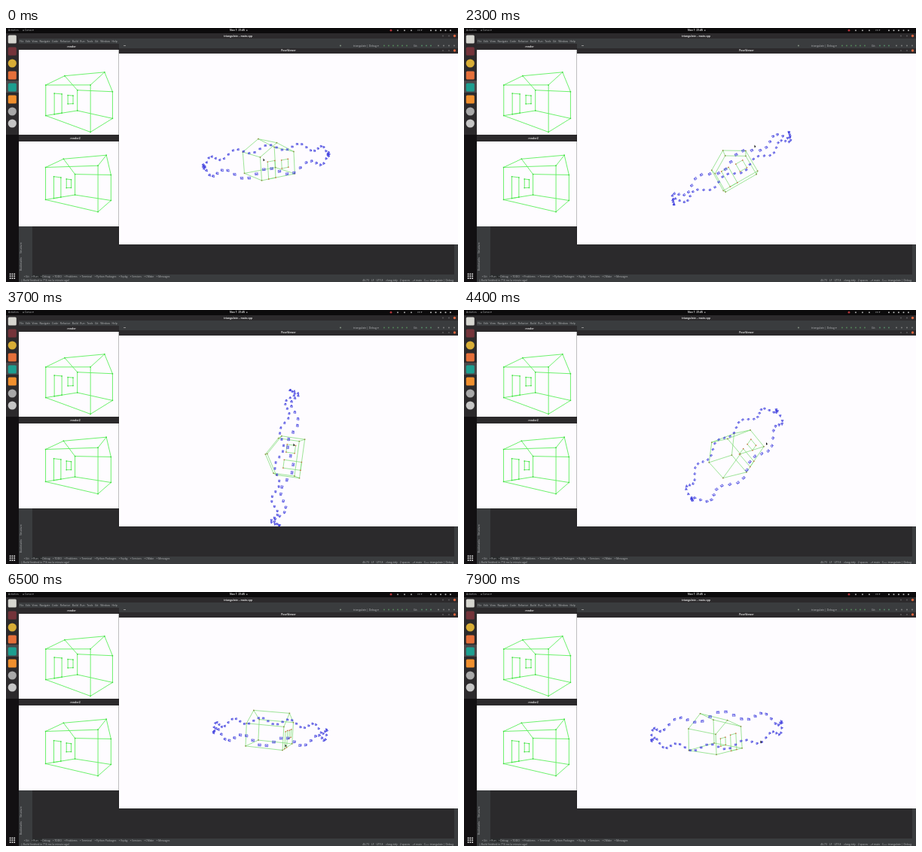
An HTML page with a canvas for the animation above (8000 ms loop, 600x338 px).

```html
<!DOCTYPE html>
<html lang="en">
<head>
<meta charset="utf-8">
<title>Pose viewer</title>
<style>
  html, body { margin: 0; width: 100%; height: 100%; overflow: hidden; background: #2b2a2c; }
  svg, canvas { position: absolute; left: 0; top: 0; width: 600px; height: 338px; }
  text { font-family: "Open Sans", "Noto Sans", sans-serif; font-size: 3.4px; fill: #b4b6b8; white-space: pre; }
  .title { font-weight: 700; fill: #dedede; text-anchor: middle; }
</style>
</head>
<body>
<svg id="desk" viewBox="0 0 600 338"></svg>
<canvas id="view"></canvas>
<script>
const desk = document.getElementById('desk');
const view = document.getElementById('view');
const g = view.getContext('2d');
const ratio = window.devicePixelRatio || 1;
view.width = 600 * ratio;
view.height = 338 * ratio;

const WHITE = '#fefcff', PANEL = '#3a3c3e', BAR = '#2c2a2c';

// ---------- desktop ----------
function add(tag, attrs, parent = desk) {
  const el = document.createElementNS('http://www.w3.org/2000/svg', tag);
  for (const key in attrs) el.setAttribute(key, attrs[key]);
  parent.appendChild(el);
  return el;
}
const box = (x, y, width, height, fill, rx = 0) => add('rect', { x, y, width, height, fill, rx });
const dot = (cx, cy, r, fill) => add('circle', { cx, cy, r, fill });
const label = (x, y, s, attrs = {}) => { add('text', { x, y, ...attrs }).textContent = s; };
const title = (x, y, s) => label(x, y, s, { class: 'title' });
const dots = (x, y, step, n, r, fill) => { for (let i = 0; i < n; i++) dot(x + i * step, y, r, fill); };

// words set one after another with an even gap
function row(x, y, gap, words, attrs = {}) {
  const line = add('text', { x, y, ...attrs });
  words.forEach((w, i) => { add('tspan', { dx: i ? gap : 0 }, line).textContent = w; });
}
function windowButtons(y) {
  dots(580, y, 8, 2, 1.1, '#575557');
  dot(595.5, y, 1.7, '#d9643f');
}

function drawIde() {
  box(0, 0, 600, 7, '#0c0b0c');
  row(3, 4.4, 5, ['Activities', '● Corvo ▾']);
  title(309, 4.4, 'Nov 1  21:45  ●');
  dot(511, 3.2, 1.4, '#b5343a');
  dots(520, 3.2, 9, 3, 1, '#a5a5a5');
  label(546, 4.4, 'en ▾');
  dots(564, 3.2, 6.5, 5, 1, '#b8b8b8');

  box(17, 7, 583, 7, BAR);
  title(308, 11.8, 'triangulate – main.cpp');
  windowButtons(10.5);
  box(17, 14, 583, 13, PANEL);
  row(18, 18.5, 2.6, 'File Edit View Navigate Code Refactor Build Run Tools Git Window Help'.split(' '));
  box(156, 23, 3, 1, '#909090');
  dot(444, 23.5, 1.1, '#7d8a7c');
  label(461, 24.7, 'triangulate | Debug ▾');
  dots(502, 23.5, 6, 6, .9, '#578a5c');
  label(541, 24.7, 'Git:');
  dots(552, 23.5, 6, 3, .9, '#578f6a');
  dots(574, 23.5, 7, 4, .9, '#858585');

  box(17, 264, 18, 64, PANEL);
  box(595, 288, 5, 40, PANEL);
  label(0, 0, 'Structure', { transform: 'translate(21 300) rotate(-90)' });
  label(0, 0, 'Bookmarks', { transform: 'translate(21 323) rotate(-90)' });

  box(17, 328, 583, 10, PANEL);
  box(35, 328, 13, 5, '#2a2c2d');
  row(24, 332, 3.6, 'Git,Run,Debug,TODO,Problems,Terminal,Python Packages,Vcpkg,Services,CMake,Messages'
    .split(',').map(s => '▪ ' + s));
  label(20, 337, '▯ Build finished in 716 ms (a minute ago)');
  row(594, 337, 3, ['46:73', 'LF', 'UTF-8', '.clang-tidy', '2 spaces', '⎇ main', 'C++: triangulate | Debug'],
    { 'text-anchor': 'end' });
}

function drawDock() {
  box(0, 7, 17, 331, '#121012');
  box(0, 7, 17, 135, '#2c2a2c');
  box(0, 70, 17, 16, '#4a484a');
  const icons = ['#d6d6d0', '#74343a', '#d8ad36', '#e5703a', '#1d9f90', '#f0902e', '#a8a8a8', '#c5c5c5'];
  icons.forEach((fill, i) => {
    const y = 15 + 16 * i;
    if ([2, 6, 7].includes(i)) dot(8.3, y, 5.6, fill);
    else box(2.8, y - 5.5, 11, 11, fill, 1.5);
  });
  for (let i = 0; i < 9; i++) box(4.7 + i % 3 * 2.8, 326.5 + Math.floor(i / 3) * 2.8, 1.8, 1.8, '#e0e0e0', .6);
}

function drawWindows() {
  box(17, 21, 133, 8, BAR);
  title(87, 26.2, 'render');
  box(17, 29, 133, 113, WHITE);
  box(17, 142, 133, 9, BAR);
  title(92, 148, 'render2');
  box(17, 151, 133, 113, WHITE);
  box(149, 27, 1, 261, '#00000040');
  box(150, 27, 450, 7, BAR);
  title(375, 31.3, 'PoseViewer');
  windowButtons(30);
  box(150, 34, 450, 254, WHITE);
}

// ---------- model ----------
const gable = a => [[a, -.5, 0], [a, -.5, .6], [a, 0, .9], [a, .5, .6], [a, .5, 0]];
const onWall = (b0, b1, z0, z1) => [[.5, b0, z0], [.5, b0, z1], [.5, b1, z1], [.5, b1, z0]];
const front = gable(.5), back = gable(-.5);
const openings = [onWall(-.3, -.09, 0, .45), onWall(.11, .31, .21, .43)];

// each camera is a small pyramid on a wavy oval ring, facing the middle
const MID = .42, CAMS = 60, TURN = .26;
const cams = Array.from({ length: CAMS }, (_, i) => {
  const t = i / CAMS * 2 * Math.PI, k = t + TURN, c = Math.cos(k), s = Math.sin(k);
  const p = 1.5 * Math.cos(t), q = 1.83 * Math.sin(t);
  const x = p * Math.cos(TURN) - q * Math.sin(TURN), y = p * Math.sin(TURN) + q * Math.cos(TURN);
  const z = MID + .1 * Math.cos(10 * k - 2.1);
  const at = (out, side, up) => [x + out * c - side * s, y + out * s + side * c, z + up];
  const rim = [[-1, -1], [1, -1], [1, 1], [-1, 1]].map(([h, v]) => at(-.022, h * .031, v * .023));
  return { rim, tip: at(.022, 0, 0) };
});

// ---------- projection ----------
const dotp = (a, b) => a.reduce((s, v, i) => s + v * b[i], 0);
const mix = (a, b, k) => a.map((v, i) => v + (b[i] - v) * k);

function axes(yaw, pitch, roll) {
  const [y, p, r] = [yaw, pitch, roll].map(d => d * Math.PI / 180);
  const right = [Math.cos(y), Math.sin(y), 0];
  const up = [-Math.sin(p) * Math.sin(y), Math.sin(p) * Math.cos(y), Math.cos(p)];
  const near = [Math.sin(y) * Math.cos(p), -Math.cos(y) * Math.cos(p), Math.sin(p)];
  return [
    right.map((v, i) => v * Math.cos(r) - up[i] * Math.sin(r)),
    right.map((v, i) => v * Math.sin(r) + up[i] * Math.cos(r)),
    near
  ];
}
const projector = (cx, cy, rows, focal, dist, mid) => ([a, b, z]) => {
  const [x, y, n] = rows.map(r => dotp(r, [a, b, z - mid]));
  const s = focal / (dist - n);
  return [cx + x * s, cy - y * s];
};

// the small windows show the house, mirrored, as a ring camera sees it
function ringView(cx, cy, yaw, height) {
  const c = Math.cos(yaw), s = Math.sin(yaw);
  return projector(cx, cy, [[-c, s, 0], [.02, -.12, 1], [-s, -c, 0]], 112, 1.77, height);
}

// ---------- drawing ----------
function trace(points, close) {
  points.forEach((p, i) => i ? g.lineTo(p[0], p[1]) : g.moveTo(p[0], p[1]));
  if (close) g.closePath();
}
function markers(points, fill, size) {
  g.fillStyle = fill;
  points.forEach(([x, y]) => g.fillRect(x - size / 2, y - size / 2, size, size));
}
function drawHouse(at, stroke, width, corner, openingCorner) {
  g.strokeStyle = stroke;
  g.lineWidth = width;
  g.beginPath();
  [front, back, ...openings].forEach(l => trace(l.map(at), true));
  front.forEach((p, i) => trace([at(p), at(back[i])]));
  g.stroke();
  markers([...front, ...back].map(at), corner, 1.5);
  markers(openings.flat().map(at), openingCorner, 1.4);
}
function drawCams(at) {
  g.strokeStyle = '#3434dc';
  g.lineWidth = .55;
  g.beginPath();
  cams.forEach(({ rim, tip }) => {
    const r = rim.map(at), p = at(tip);
    trace(r, true);
    r.forEach(v => trace([v, p]));
  });
  g.stroke();
}
function drawPointer(x, y) {
  g.fillStyle = '#161616';
  g.beginPath();
  trace([[x - .5, y - 1.6], [x - .5, y + 2.2], [x + 1.6, y + 1]], true);
  g.fill();
}

// time, centre x and y, yaw, pitch, roll, pointer x and y
const POSES = [
  [0, 348, 173.5, 61, 11.5, 3.5, 342, 175],
  [900, 365, 171, 84, 14, 4, 356, 179],
  [1300, 371, 161, 123, 35, 16, 366, 190],
  [2300, 357, 187, 89, -6, 30, 386, 157],
  [3700, 369, 195, 89, 5.5, 82, 382, 179],
  [5100, 347, 181, 17, 30, -1, 421, 176],
  [6500, 351, 183, 17, 8.5, -3, 371, 204],
  [7500, 340, 184, -30, -28, 0, 388, 190],
  [7900, 333, 189, -43, -15, 2, 394, 199]
];
function poseAt(t) {
  const i = Math.max(0, POSES.findLastIndex(p => p[0] <= t));
  const a = POSES[i], b = POSES[i + 1];
  return b ? mix(a, b, (t - a[0]) / (b[0] - a[0])) : a;
}

const small = [ringView(100, 80, .62, .61), ringView(101, 195.5, .49, .53)];

function draw(t) {
  const [, cx, cy, yaw, pitch, roll, px, py] = poseAt(t);
  const at = projector(cx, cy, axes(yaw, pitch, roll), 470, 9.5, MID);
  g.setTransform(ratio, 0, 0, ratio, 0, 0);
  g.clearRect(0, 0, 600, 338);
  small.forEach(p => drawHouse(p, '#5cf05c', .9, '#3fd63f', '#3fd63f'));
  g.save();
  g.beginPath();
  g.rect(150, 34, 450, 254);
  g.clip();
  drawHouse(at, '#7cdc74', .75, '#8d8a40', '#d0643c');
  drawCams(at);
  g.restore();
  drawPointer(px, py);
}

drawIde();
drawDock();
drawWindows();

const start = performance.now();
function tick() {
  const t = (performance.now() - start) % 8000;
  draw(Math.floor(t / 100) * 100);
  requestAnimationFrame(tick);
}
tick();
</script>
</body>
</html>
```
